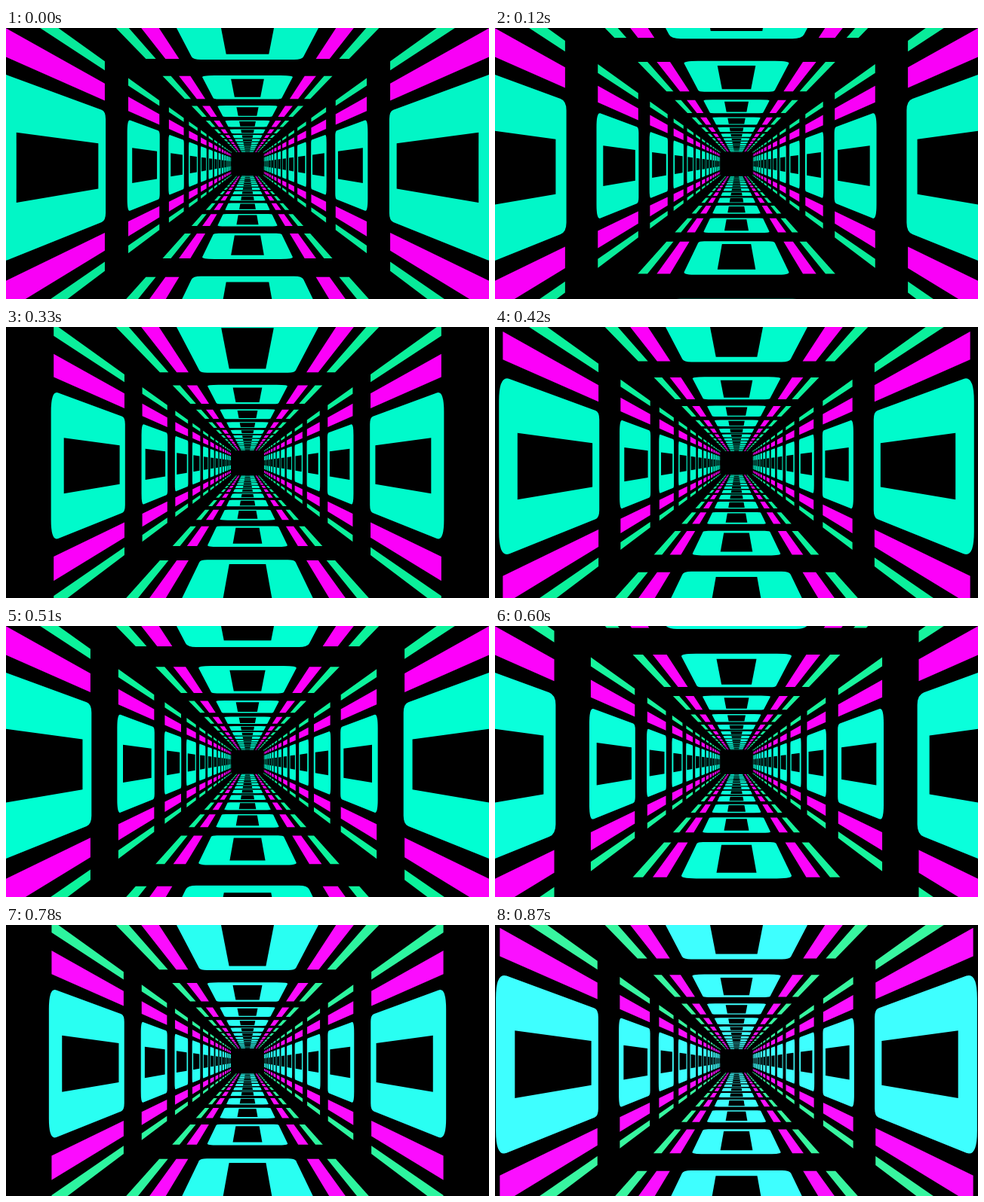
Write an HTML page with a canvas that moves like this. It is 640 px wide and 360 px high and loops after 900 ms.

```html
<!DOCTYPE html>
<html lang="en">
<head>
<meta charset="utf-8">
<title>Neon tunnel</title>
<style>
  html, body { margin: 0; width: 100%; height: 100%; overflow: hidden; background: #000; }
  canvas { display: block; width: 640px; height: 360px; }
</style>
</head>
<body>
<canvas id="stage" width="640" height="360"></canvas>
<script>
const ctx = document.getElementById('stage').getContext('2d');
const LOOP = 900, STEP = 30;
const CX = 320, CY = 180;
const FOCAL = 305;      // half width of the tunnel, in pixels, at depth 1
const SPEED = 0.00225;  // tiles per ms
const TILES = 14;
const END = 21.8;       // half width of the dark far end
const CEIL = -0.735, FLOOR = 0.797;

// Each side maps depth u and cross position v to the screen.
const side = (project, bands) => ({
  at(u, v) {
    const d = FOCAL / Math.max(u, 0.05);
    const [x, y] = project(d, v);
    return [CX + x, CY + y];
  },
  ...bands
});

const wallBands = {
  green: [[-0.718, -0.655], [0.69, 0.755]],
  pink: [[-0.562, -0.442], [0.487, 0.612]],
  panel: [-0.369, 0.403],
  hole: [-0.135, 0.17]
};
const deckBands = {
  green: [[-0.712, -0.642], [0.642, 0.712]],
  pink: [[-0.575, -0.479], [0.479, 0.575]],
  panel: [-0.384, 0.384],
  hole: [-0.143, 0.143]
};

const sides = [
  side((d, v) => [-d, v * d], wallBands),
  side((d, v) => [d, v * d], wallBands),
  side((d, v) => [v * d, CEIL * d], deckBands),
  side((d, v) => [v * d, FLOOR * d], deckBands)
];

// Colours drift from teal to cyan over the loop: [time, r, g, b]
const tealStops = [[0, 2, 246, 198], [420, 0, 251, 204], [510, 0, 255, 210], [690, 20, 255, 228], [870, 62, 255, 255]];
const greenStops = [[0, 8, 234, 154], [510, 12, 243, 156], [870, 56, 246, 160]];
const pinkStops = [[0, 248, 0, 246], [510, 253, 0, 250], [870, 250, 16, 255]];

function colorAt(stops, t) {
  let i = 1;
  while (i < stops.length - 1 && t > stops[i][0]) i++;
  const a = stops[i - 1], b = stops[i];
  const k = Math.min(1, (t - a[0]) / (b[0] - a[0]));
  const mix = n => Math.round(a[n] + (b[n] - a[n]) * k);
  return `rgb(${mix(1)},${mix(2)},${mix(3)})`;
}

function quad(s, u0, u1, [v0, v1], color) {
  ctx.beginPath();
  ctx.moveTo(...s.at(u0, v0));
  ctx.lineTo(...s.at(u1, v0));
  ctx.lineTo(...s.at(u1, v1));
  ctx.lineTo(...s.at(u0, v1));
  ctx.fillStyle = color;
  ctx.fill();
}

// The near corners are rounded more softly than the far ones.
function roundQuad(s, u0, u1, [v0, v1], color) {
  const ru = 0.045, near = 0.11, far = 0.055;
  const curve = (cu, cv, u, v) => ctx.quadraticCurveTo(...s.at(cu, cv), ...s.at(u, v));
  ctx.beginPath();
  ctx.moveTo(...s.at(u0 + ru, v0));
  ctx.lineTo(...s.at(u1 - ru, v0));
  curve(u1, v0, u1, v0 + far);
  ctx.lineTo(...s.at(u1, v1 - far));
  curve(u1, v1, u1 - ru, v1);
  ctx.lineTo(...s.at(u0 + ru, v1));
  curve(u0, v1, u0, v1 - near);
  ctx.lineTo(...s.at(u0, v0 + near));
  curve(u0, v0, u0 + ru, v0);
  ctx.fillStyle = color;
  ctx.fill();
}

function draw(t) {
  const teal = colorAt(tealStops, t);
  const green = colorAt(greenStops, t);
  const pink = colorAt(pinkStops, t);
  const first = (3.93 - t * SPEED) % 1;

  ctx.fillStyle = '#000';
  ctx.fillRect(0, 0, 640, 360);
  for (let i = TILES - 1; i >= 0; i--) {
    const u = first + i;
    for (const s of sides) {
      s.green.forEach(b => quad(s, u, u + 0.683, b, green));
      s.pink.forEach(b => quad(s, u, u + 0.683, b, pink));
      roundQuad(s, u - 0.016, u + 0.693, s.panel, teal);
      quad(s, u + 0.066, u + 0.613, s.hole, '#000');
    }
  }
  ctx.fillStyle = '#000';
  ctx.fillRect(CX - END, CY - 14.5, END * 2, 30);
}

function tick() {
  const t = performance.now() % LOOP;
  draw(Math.floor(t / STEP) * STEP);
  requestAnimationFrame(tick);
}
tick();
</script>
</body>
</html>
```
